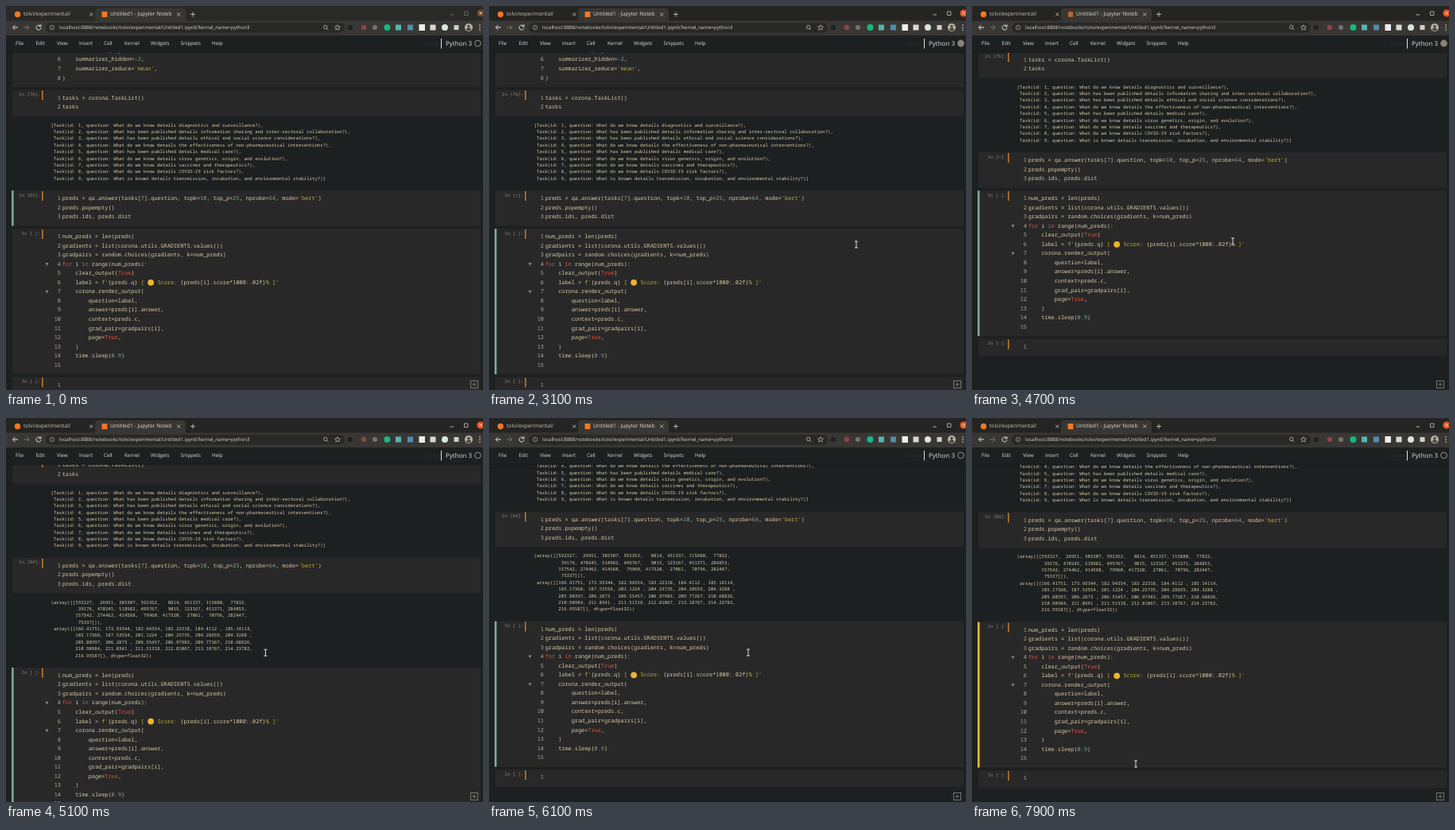
Recreate the animation shown at these times as an HTML page with a canvas. Size 600 by 483 pixels, loop 8 s.

```html
<!DOCTYPE html>
<html lang="en">
<head>
<meta charset="utf-8">
<title>Notebook session</title>
<style>
  html, body { margin: 0; width: 100%; height: 100%; overflow: hidden; background: #1d2021; }
  canvas { display: block; width: 600px; height: 483px; }
</style>
</head>
<body>
<canvas id="stage" width="600" height="483"></canvas>
<script>
const ctx = document.getElementById('stage').getContext('2d');
const LOOP = 8000, CLICK = 1770, RUN = 2800, BUSY_ICON = 3700, DONE = 4900, CLICK_2 = 7380;

const MONO = '"Noto Sans Mono", "DejaVu Sans Mono", monospace';
const SANS = '"Open Sans", "Noto Sans", sans-serif';
const CODE_FONT = `6.88px ${MONO}`, OUT_FONT = `5.71px ${MONO}`;
const CODE_X = 70.7, CODE_COL = 6.88 * 0.6, CODE_STEP = 11.54, OUT_STEP = 8.37, GAP = 3.5;
const C = {
  page: '#1d2021', cell: '#282828', text: '#d9caa5', number: '#83a598', string: '#c0b030',
  keyword: '#ef4b38', gutter: '#bdae93', dim: '#8f8577', prompt: '#e28a2e',
  command: '#7ca99a', edit: '#f2b92f', light: '#e4e0d8', orange: '#f37726'
};

const setupCode = ['', '', '', '', '    summarizer_layer=1,', '    summarizer_hidden=-2,',
  "    summarizer_reduce='mean',", ')'];
const taskCode = ['tasks = corona.TaskList()', 'tasks'];
const queryCode = ["preds = qa.answer(tasks[7].question, topk=10, top_p=25, nprobe=64, mode='bert')",
  'preds.popempty()', 'preds.ids, preds.dist'];
const loopCode = `num_preds = len(preds)
gradients = list(corona.utils.GRADIENTS.values())
gradpairs = random.choices(gradients, k=num_preds)
for i in range(num_preds):
    clear_output(True)
    label = f'{preds.q} [    Score: {preds[i].score*1000:.02f}% ]'
    corona.render_output(
        question=label,
        answer=preds[i].answer,
        context=preds.c,
        grad_pair=gradpairs[i],
        page=True,
    )
    time.sleep(0.9)
`.split('\n');

const taskOutput = [
  'What do we know details diagnostics and surveillance?',
  'What has been published details information sharing and inter-sectoral collaboration?',
  'What has been published details ethical and social science considerations?',
  'What do we know details the effectiveness of non-pharmaceutical interventions?',
  'What has been published details medical care?',
  'What do we know details virus genetics, origin, and evolution?',
  'What do we know details vaccines and therapeutics?',
  'What do we know details COVID-19 risk factors?',
  'What is known details transmission, incubation, and environmental stability?'
].map((q, i, all) =>
  `${i ? ' ' : '['}Task(id: ${i + 1}, question: ${q})${i < all.length - 1 ? ',' : ']'}`);

const arrayOutput = `(array([[592327,  26951, 385307, 592352,   8814, 451337, 115880,  77832,
          39176, 470245, 518982, 499767,   9015, 123167, 451371, 284853,
         157542, 274462, 414588,  79960, 417320,  27061,  70796, 282447,
          75337]]),
 array([[166.41751, 173.93344, 182.94354, 183.22318, 184.4112 , 185.14114,
         185.17368, 187.53554, 201.1224 , 204.23735, 204.28659, 204.3288 ,
         205.80397, 206.2873 , 206.55457, 206.97983, 209.77267, 210.68826,
         210.98984, 211.0341 , 211.51318, 212.81067, 213.18767, 214.23782,
         216.95587]], dtype=float32))`.split('\n');

const scrollKeys = [[4200, 0], [4300, 5], [4370, 30], [4450, 48], [5080, 48], [5200, 95],
  [5350, 137.9], [5860, 137.9], [5900, 135.9], [6000, 121], [6100, 114.5], [6200, 113.5]];
const mouseKeys = [[1300, 428, 190], [1770, 443, 268], [1800, 446, 288], [1900, 456, 295],
  [2000, 462, 300], [3700, 462, 300], [4300, 410, 304], [4600, 333, 297], [4700, 328, 296],
  [5200, 326, 295], [6600, 326, 295], [7400, 204, 427], [7700, 206, 435]];

// Linear interpolation through keys of the form [time, ...values].
function track(keys, t) {
  const next = keys.findIndex(key => key[0] > t);
  if (next === 0) return keys[0].slice(1);
  if (next < 0) return keys[keys.length - 1].slice(1);
  const a = keys[next - 1], b = keys[next], k = (t - a[0]) / (b[0] - a[0]);
  return a.slice(1).map((v, i) => v + (b[i + 1] - v) * k);
}

function rect(x, y, w, h, color) {
  ctx.fillStyle = color;
  ctx.fillRect(x, y, w, h);
}
function text(str, x, y, font, color, align = 'left') {
  ctx.font = font;
  ctx.fillStyle = color;
  ctx.textAlign = align;
  ctx.fillText(str, x, y);
}
function dot(x, y, r, color) {
  ctx.fillStyle = color;
  ctx.beginPath();
  ctx.arc(x, y, r, 0, 7);
  ctx.fill();
}
function stroke(path, color, width = 1) {
  ctx.strokeStyle = color;
  ctx.lineWidth = width;
  ctx.stroke(new Path2D(path));
}
function pill(x, y, w, h, r, color) {
  ctx.fillStyle = color;
  ctx.beginPath();
  ctx.roundRect(x, y, w, h, r);
  ctx.fill();
}

function tokens(line) {
  return line.split(/(f?'[^']*'|\b(?:for|in|True)\b|\b\d[\d.]*\b)/).flatMap(part => {
    if (/^f?'/.test(part))
      return part.split(/(\{[^}]*\})/).map(s => [s, s[0] === '{' ? C.text : C.string]);
    if (/^(for|in|True)$/.test(part)) return [[part, C.keyword]];
    return [[part, /^\d/.test(part) ? C.number : C.text]];
  });
}

function drawLine(line, y) {
  let col = 0;
  for (const [str, color] of tokens(line)) {
    if (str.trim()) text(str, CODE_X + col * CODE_COL, y, CODE_FONT, color);
    col += str.length;
  }
}

// Draws a cell and returns the y coordinate where the next block starts.
function drawCell(y, label, code, { bar, caret, folds = [] } = {}) {
  const height = 21.5 + (code.length - 1) * CODE_STEP;
  rect(8, y, 589, height, C.cell);
  if (bar) rect(7, y, 2.6, height, bar);
  text(label, 43.5, y + 6, OUT_FONT, C.dim, 'right');
  rect(45.2, y + 0.8, 1.3, 12, C.prompt);
  code.forEach((line, i) => {
    const mid = y + 10 + i * CODE_STEP;
    text(i + 1, 69, mid, CODE_FONT, C.gutter, 'right');
    drawLine(line, mid);
    if (line.includes("f'")) dot(CODE_X + 27 * CODE_COL, mid, 3.9, '#f0b32c');
    if (folds.includes(i + 1)) {
      ctx.fillStyle = C.dim;
      ctx.fill(new Path2D(`M49.5 ${mid - 1.7}h4l-2 3.8z`));
    }
    if (caret && i === code.length - 1)
      rect(CODE_X + line.length * CODE_COL, mid - 5.5, 1, 11, C.light);
  });
  return y + height + GAP;
}

function drawOutput(y, lines) {
  const first = y - GAP + 11.5;
  lines.forEach((line, i) => text(line, 56.5, first + i * OUT_STEP, OUT_FONT, C.text));
  return first + (lines.length - 1) * OUT_STEP + 15;
}

function drawNotebook(t) {
  const [scroll] = track(scrollKeys, t);
  const editing = t >= CLICK && t < RUN;
  let y = drawCell(-0.2 - scroll, 'In [75]:', setupCode);
  y = drawCell(y, 'In [76]:', taskCode);
  y = drawOutput(y, taskOutput);
  y = drawCell(y, t < RUN ? 'In [83]:' : t < DONE ? 'In [+]:' : 'In [84]:', queryCode, {
    bar: t < RUN && (editing ? C.edit : C.command),
    caret: editing && t < 2290
  });
  if (t >= DONE) y = drawOutput(y, arrayOutput);
  y = drawCell(y, 'In [ ]:', loopCode, {
    bar: t >= RUN && (t >= CLICK_2 ? C.edit : C.command),
    caret: t >= CLICK_2 && t < 7890,
    folds: [4, 7]
  });
  drawCell(y, 'In [ ]:', ['']);
  ctx.strokeStyle = '#77736a';
  ctx.lineWidth = 1;
  ctx.strokeRect(584.5, 471.5, 9, 9);
  stroke('M586.5 476h5M589 473.5v5', '#77736a');
}

function drawBrowser(t) {
  const focused = t >= CLICK;
  rect(0, 0, 600, 19, focused ? '#242422' : '#292927');
  pill(112, 3, 114, 18, 4, '#383734');
  rect(0, 18.5, 600, 18.5, '#383734');
  dot(14.5, 10.5, 3.7, C.orange);
  text('tolvi/experimental/', 22, 10.5, `6.7px ${SANS}`, '#c8c4bc');
  if (t >= BUSY_ICON && t < DONE) rect(121, 7.2, 6, 6.6, '#b7672f');
  else rect(120.6, 7, 6.8, 7, C.orange);
  text('Untitled1 - Jupyter Noteb', 131, 10.5, `6.7px ${SANS}`, C.light);
  stroke('M105.3 8.5l4 4m0-4l-4 4M215.3 8.5l4 4m0-4l-4 4M232 10.5h6m-3-3v6', '#c8c4bc', 0.9);

  const control = focused ? '#c8c4bc' : '#77736a';
  stroke('M558.5 11h4.5', control, 0.9);
  stroke('M576.5 7h4.5v4.5h-4.5z', control, 0.8);
  dot(597, 9, 4.6, focused ? '#e95420' : '#70432f');
  stroke('M595.2 7.2l3.6 3.6m0-3.6l-3.6 3.6', '#f5e8e0', 0.8);

  pill(50, 21, 376, 12.5, 6, '#282826');
  stroke('M15 27h-6.5m3-3l-3 3l3 3', C.light, 1);
  stroke('M22.5 27h6.5m-3-3l3 3l-3 3', '#77736a', 1);
  stroke('M43.2 25a3 3 0 1 0 .8 2.4M44 23.2v2.6h-2.6', C.light, 1);
  stroke('M55.2 27a2.8 2.8 0 1 0 5.6 0a2.8 2.8 0 1 0-5.6 0M58 26.5v2M58 25v.7', '#aaa69e', 0.7);
  text('localhost:8888/notebooks/tolvi/experimental/Untitled1.ipynb?kernel_name=python3',
    67, 27, `6.1px ${SANS}`, '#dfdbd3');
  stroke('M399.5 26.5a2.2 2.2 0 1 0 4.4 0a2.2 2.2 0 1 0-4.4 0M403.4 28.3l2 2', '#c8c4bc', 0.8);
  stroke('M417 23.7l1 2.2l2.4.2l-1.8 1.6l.6 2.4l-2.2-1.3l-2.2 1.3l.6-2.4l-1.8-1.6l2.4-.2z',
    '#c8c4bc', 0.7);

  dot(433, 27, 3.2, '#20201f');
  dot(450, 27, 3.2, '#8d4348');
  dot(464, 27, 3, '#77716f');
  dot(479.5, 27, 4, '#15b985');
  rect(490, 23.5, 7, 7, '#58b4b0');
  rect(505, 23.5, 7, 7, '#5689ac');
  rect(519.5, 23, 7.5, 8, '#eeeeec');
  rect(533.5, 23.5, 7, 7, '#d8d7d3');
  dot(552, 27, 4, '#dbe5d9');
  rect(563.5, 24, 6, 6, '#d0cdc7');
  dot(582, 27, 5, '#b8b3a7');
  dot(582, 25.5, 1.7, '#49433e');
  pill(579.2, 27.6, 5.6, 3.4, 1.7, '#49433e');
  [24, 27, 30].forEach(y => dot(596, y, 0.8, C.light));
}

function drawMenu(t) {
  rect(0, 37, 600, 21.3, C.page);
  rect(0, 57.8, 600, 0.8, '#151819');
  const items = { File: 12, Edit: 37.5, View: 64, Insert: 92, Cell: 123, Kernel: 149,
    Widgets: 182, Snippets: 219.5, Help: 259 };
  for (const [name, x] of Object.entries(items)) text(name, x, 47.8, `6.3px ${SANS}`, C.light);
  text('Trusted', 525, 47.5, `5.6px ${SANS}`, '#303334');
  rect(547, 41, 1, 12.5, C.light);
  text('Python 3', 553, 47.8, `8px ${SANS}`, C.light);
  if (t >= RUN && t < DONE) dot(593.5, 47, 4.4, '#8b8174');
  else stroke('M589.7 47a3.8 3.8 0 1 0 7.6 0a3.8 3.8 0 1 0-7.6 0', '#a89f90', 0.9);
}

function drawPointer(t) {
  if (t < mouseKeys[0][0]) return;
  const [x, y] = track(mouseKeys, t);
  const beam = `M${x - 2} ${y - 4}h4m-2 0v8m-2 0h4`;
  stroke(beam, '#1a1a1a', 2);
  stroke(beam, '#e8e6e0', 1);
}

function frame(now) {
  const t = now % LOOP;
  ctx.textBaseline = 'middle';
  ctx.textRendering = 'geometricPrecision';
  ctx.fontVariantLigatures = 'none';
  rect(0, 0, 600, 483, C.page);
  drawNotebook(t);
  drawBrowser(t);
  drawMenu(t);
  drawPointer(t);
  requestAnimationFrame(frame);
}
requestAnimationFrame(frame);
</script>
</body>
</html>
```
